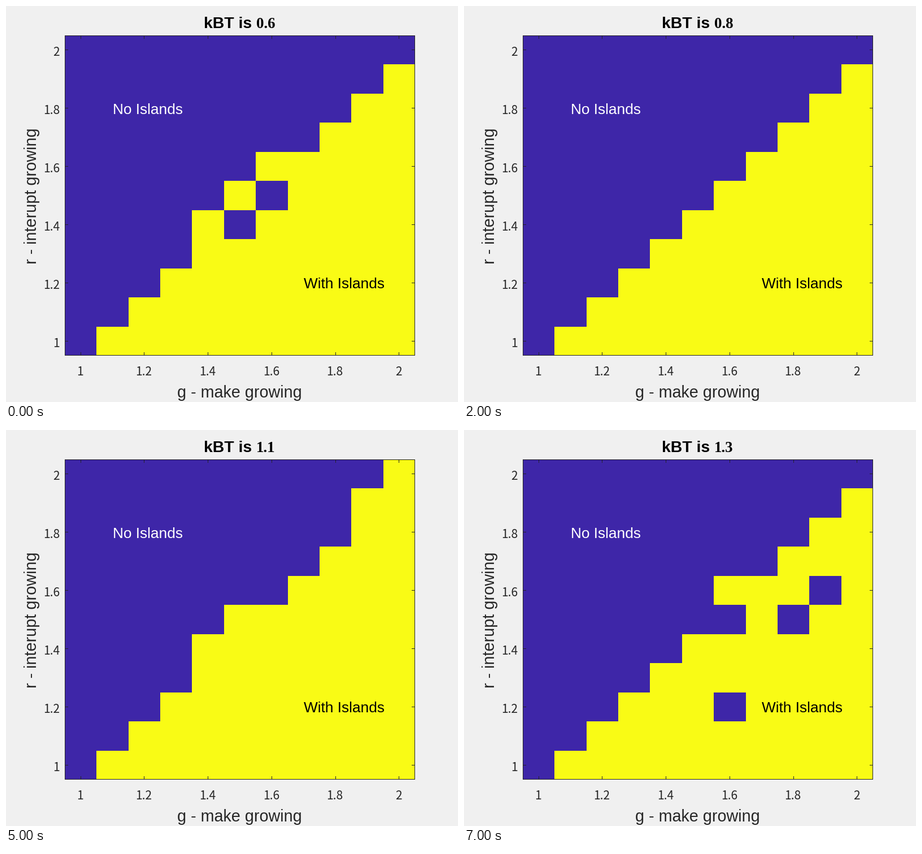
Recreate the animation shown at these times as a matplotlib script. Size 800 by 700 pixels, loop 8 s.

```python
import numpy as np
import matplotlib.pyplot as plt
from matplotlib.animation import FuncAnimation
from matplotlib.colors import ListedColormap

W, H, DPI = 800, 700, 100
LEFT, RIGHT, TOP, BOTTOM = 104, 724, 52, 618
N, STEPS, TICK = 11, 8, 6
INK = "#262626"

# Islands form where g > r. Per step: ties (g == r) that also form them,
# and the few (g, r) cells below the diagonal that fail to.
TIES = [(4, 5, 6), (), (), (1, 2, 4, 5, 6), (1, 2, 4, 5, 6, 7),
        (4, 5, 9, 10), (0, 1, 5), (6,)]
FAILS = {0: [(5, 4), (6, 5)], 1: [(6, 5)],
         7: [(6, 5), (6, 2), (8, 5), (9, 6)]}

fig = plt.figure(figsize=(W / DPI, H / DPI), dpi=DPI, facecolor="#f0f0f0")
ax = fig.add_axes([0, 0, 1, 1])
ax.set_xlim(0, W)
ax.set_ylim(H, 0)
ax.axis("off")


def px(size):
    return size * 72 / DPI


def label(x, y, text, size, color=INK, font="Liberation Sans", ha="left", **kw):
    return ax.text(x, y, text, fontsize=px(size), color=color, family=font,
                   ha=ha, va="baseline", **kw)


def line(xs, ys):
    ax.plot(xs, ys, color=INK, lw=px(1), zorder=3, snap=False,
            solid_capstyle="butt")


def phase(step):
    r, g = np.indices((N, N))
    grid = (g > r).astype(float)
    for k in TIES[step]:
        grid[k, k] = 1
    for col, row in FAILS.get(step, []):
        grid[row, col] = 0
    return grid


x_edges = np.round(np.linspace(LEFT, RIGHT, N + 1))
y_edges = np.round(np.linspace(BOTTOM, TOP, N + 1))
mesh = ax.pcolormesh(x_edges, y_edges, phase(0), vmin=0, vmax=1,
                     cmap=ListedColormap(["#3e26a8", "#f9fb15"]),
                     antialiased=False)

# Frame, then ticks pointing inward from each side
for x in (LEFT + 0.5, RIGHT - 0.5):
    line([x, x], [TOP, BOTTOM])
for y in (TOP + 0.5, BOTTOM - 0.5):
    line([LEFT, RIGHT], [y, y])

for k in range(0, N, 2):
    name = f"{1 + k / 10:g}"
    tx = LEFT + (k + 0.5) * (RIGHT - LEFT) / N
    ty = BOTTOM - (k + 0.5) * (BOTTOM - TOP) / N
    sx, sy = int(tx) + 0.5, int(ty) + 0.5
    for y, inward in ((TOP, TICK), (BOTTOM, -TICK)):
        line([sx, sx], [y, y + inward])
    for x, inward in ((LEFT, TICK), (RIGHT, -TICK)):
        line([x, x + inward], [sy, sy])
    label(tx - 1, 653, name, 21, font="Noto Sans CJK JP", ha="center")
    label(95, ty + 10.5, name, 21, font="Noto Sans CJK JP", ha="right")

label(413.5, 692, "g - make growing", 28.7, ha="center")
label(54, 335.5, "r - interupt growing", 28.9, ha="center",
      rotation=90, rotation_mode="anchor")
label(189, 191, "No Islands", 26.3, "white")
label(527, 499, "With Islands", 26.3, "black")

title = label(0, 39, "kBT is", 28.4, "black", weight="bold")
value = label(0, 39, "", 27, "black", "Liberation Serif", weight="bold")


def update(step):
    text = f"{0.6 + step / 10:g}"
    # The heading stays centred as the value gets shorter
    start = 350 + 5 * (3 - len(text))
    mesh.set_array(phase(step))
    title.set_x(start)
    value.set_x(start + 92.5)
    value.set_text(text)
    return mesh, title, value


anim = FuncAnimation(fig, update, frames=STEPS, interval=1000,
                     repeat=True, repeat_delay=0, blit=False)
plt.show()
```
